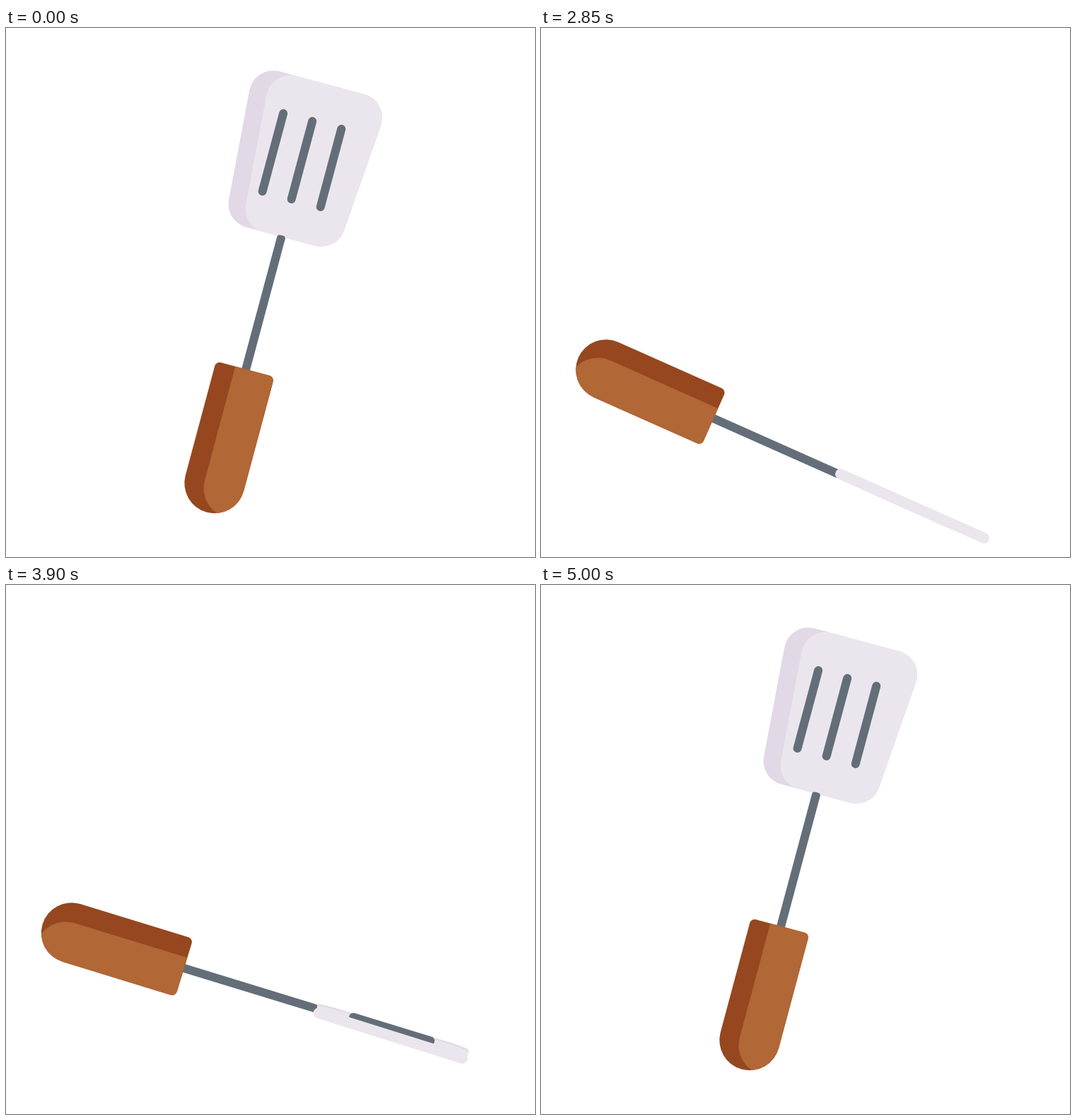
An HTML page with a canvas that plays this animation: 748x748 px, repeating every 5.02 s.

```html
<!DOCTYPE html>
<html lang="en">
<head>
<meta charset="utf-8">
<title>Spatula</title>
<style>
  html, body { margin: 0; height: 100%; overflow: hidden; background: #fff; }
  canvas { display: block; width: 100vw; height: 100vh; }
</style>
</head>
<body>
<canvas id="stage" width="748" height="748"></canvas>
<script>
const ctx = document.getElementById('stage').getContext('2d');
const LOOP = 5020, PIVOT = 175;
const LIGHT = '#ebe6ed', SHADE = '#e1d9e6', STEEL = '#636e78',
      WOOD = '#b16736', DARK_WOOD = '#96471f';

// Poses: pivot position, angle in degrees, apparent blade width
const REST = { x: 340.3, y: 474.5, angle: 15, width: 1 };
const DIP = { x: 251.8, y: 554.4, angle: 114, width: 0 };
const LIFT = { x: 299, y: 488.5, angle: 73, width: 0.55 };
const BEND = { x: 352, y: 533 };
const OVERSHOOT = 11;

const mix = (a, b, k) => a + (b - a) * k;
const ease = (t, from, to) => {
  const x = Math.min(1, Math.max(0, (t - from) / (to - from)));
  return (1 - Math.cos(Math.PI * x)) / 2;
};
const blend = (a, b, k) => {
  const pose = {};
  for (const key in a) pose[key] = mix(a[key], b[key], k);
  return pose;
};

// Swing between rest (0) and dip (1) along a curved path
function swing(k) {
  const pose = blend(REST, DIP, k);
  for (const axis of ['x', 'y'])
    pose[axis] = mix(mix(REST[axis], BEND[axis], k), mix(BEND[axis], DIP[axis], k), k);
  return pose;
}

function poseAt(t) {
  let pose;
  if (t < 2850) pose = swing(ease(t, 2000, 2622));
  else if (t < 4065) pose = blend(DIP, LIFT, ease(t, 2850, 3231) - ease(t, 3485, 4055));
  else {
    const k = ease(t, 4065, 4765);
    pose = swing(1 - k);
    pose.angle = mix(mix(DIP.angle, OVERSHOOT, k), REST.angle, ease(t, 4765, 5000));
    pose.edge = k ** 0.6;
  }
  pose.edge ??= pose.width;
  return pose;
}

function fillShape(color, build) {
  ctx.fillStyle = color;
  ctx.beginPath();
  build();
  ctx.fill();
}

function line(x1, y1, x2, y2, width, color) {
  ctx.lineCap = 'round';
  ctx.lineWidth = width;
  ctx.strokeStyle = color;
  ctx.beginPath();
  ctx.moveTo(x1, y1);
  ctx.lineTo(x2, y2);
  ctx.stroke();
}

// Rounded trapezoid; inset moves its left side inwards
function bladePath(inset) {
  const corners = [[99, -586], [82, -361], [inset - 82, -361], [inset - 99, -586]];
  ctx.moveTo(0, -586);
  corners.forEach((c, i) => ctx.arcTo(...c, ...(corners[i + 1] || [0, -586]), 34));
  ctx.closePath();
}

function drawBlade({ width, edge }) {
  ctx.save();
  ctx.scale(Math.max(width, 0.001), 1);
  fillShape(SHADE, () => bladePath(0));
  fillShape(LIGHT, () => bladePath(25));
  ctx.restore();

  fillShape(STEEL, () => ctx.roundRect(-5, -363, 12, 205, [4, 4, 0, 0]));
  for (const i of [-1, 0, 1]) {
    const x = 1 + i * 42.5 * width;
    line(x, -416, x, -530, 12, STEEL);
  }

  // Near edge, seen as a thin strip
  const half = (222 - 94 * width) / 2, lean = 0.075 * edge * half;
  line(72 * edge - lean, half - 474, 72 * edge + lean, -half - 474, 15, LIGHT);
}

function drawHandle() {
  const body = () => ctx.roundRect(-42.7, -167, 85.4, 209.7, [7, 7, 42.7, 42.7]);
  fillShape(DARK_WOOD, body);
  ctx.save();
  ctx.beginPath();
  body();
  ctx.clip();
  fillShape(WOOD, () => ctx.roundRect(-14.5, -180, 85.4, 222.7, [0, 0, 42.7, 42.7]));
  ctx.restore();
}

function draw(t) {
  const pose = poseAt(t);
  ctx.clearRect(0, 0, 748, 748);
  ctx.save();
  ctx.translate(pose.x, pose.y);
  ctx.rotate(pose.angle * Math.PI / 180);
  ctx.translate(0, PIVOT);
  drawBlade(pose);
  drawHandle();
  ctx.restore();
}

const start = performance.now();
function tick() {
  draw((performance.now() - start) % LOOP);
  requestAnimationFrame(tick);
}
tick();
</script>
</body>
</html>
```
